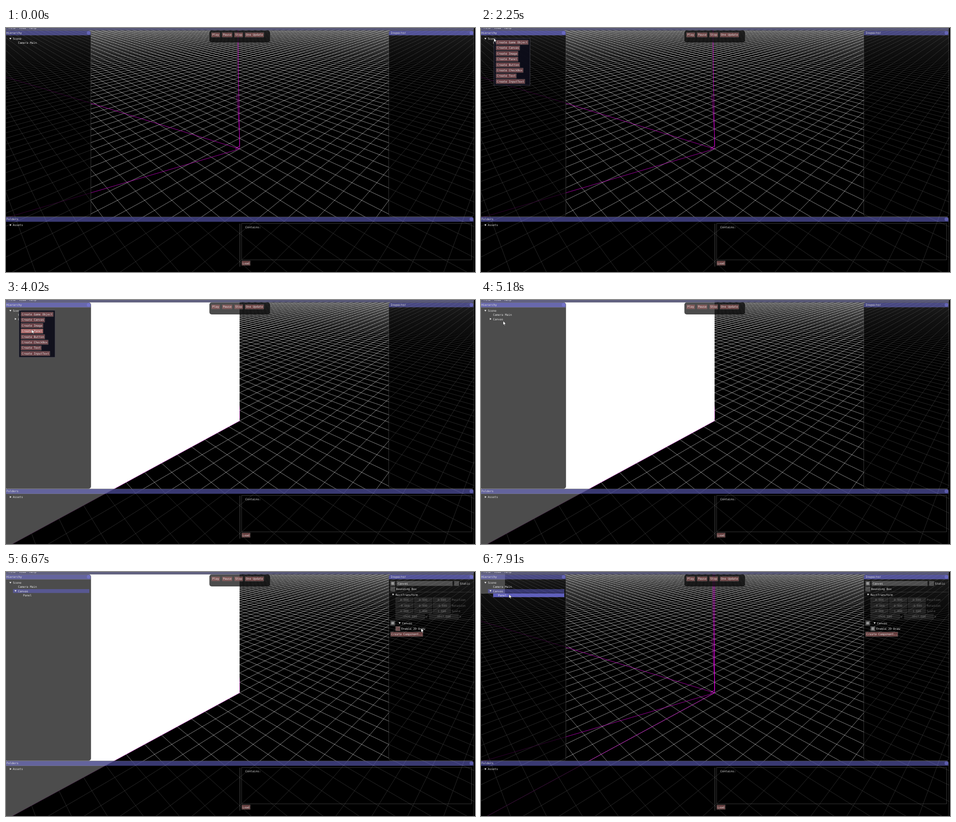
Recreate the animation shown at these times as an HTML page with a canvas. Size 1036 by 541 pixels, loop 8000 ms.

```html
<!DOCTYPE html>
<html>
<head>
<meta charset="utf-8">
<style>
html, body { margin: 0; width: 100%; height: 100%; overflow: hidden; background: #000; }
canvas { display: block; width: 100vw; height: 100vh; }
</style>
</head>
<body>
<canvas id="stage" width="1036" height="541"></canvas>
<script>
const LOOP = 8000, W = 1036, H = 541, CHAR = 3.777, ROW = 9.15, STEP = 12.4, INDENT = 11.3;
const ORIGIN = [516, 268], SLOPE = 0.544;
const ENTER = 150, POPUP = 2250, HELD = 3880, CREATE = 4020, CLOSE = 4790;
const SELECT = 5410, EXPAND = 5490, PRESS = 6590, FLAT = 6750;
const C = {
  text: '#e6e6e6', button: 'rgba(171,102,102,.6)', hot: 'rgb(171,102,102)',
  down: 'rgb(204,128,128)', border: 'rgba(90,90,90,.8)', frame: 'rgba(204,204,204,.3)',
  header: 'rgba(102,102,230,.45)', headerHot: 'rgba(115,115,230,.8)',
  title: 'rgba(69,69,138,.83)', titleOn: 'rgba(82,82,161,.87)',
  shade: 'rgba(0,0,0,.7)', magenta: '#d400d4'
};
const ITEMS = ['Game Object', 'Canvas', 'Image', 'Panel', 'Button', 'CheckBox', 'Text', 'InputText'];
// pointer moves: start, end, then where it stops
const MOVES = [
  [ENTER, 930, 36, 23], [1020, 1400, 28.5, 22.5], [2400, 2870, 58, 61], [2950, 3090, 57, 65.5],
  [4260, 4640, 140, 114], [4640, 5180, 49, 46.8], [5300, 5330, 48, 43], [5570, 6200, 1008, 164],
  [6200, 6440, 917, 125], [6830, 7180, 560, 24], [7180, 7680, 78, 60], [7680, 7910, 62, 49.5]
];

const ctx = document.getElementById('stage').getContext('2d');
let mouse;

function pointer(t) {
  if (t < ENTER) return [-99, -99];
  let x = 873, y = 518;
  for (const [start, end, toX, toY] of MOVES) {
    const k = Math.min(1, Math.max(0, (t - start) / (end - start)));
    const ease = k * k * (3 - 2 * k);
    x += (toX - x) * ease;
    y += (toY - y) * ease;
  }
  return [x, y];
}

function over(x, y, w, h) {
  return mouse[0] >= x && mouse[0] < x + w && Math.abs(mouse[1] - y) < h / 2;
}

function box(x, y, w, h, fill, stroke, r = 0) {
  ctx.beginPath();
  ctx.roundRect(x, y, w, h, r);
  if (fill) { ctx.fillStyle = fill; ctx.fill(); }
  if (stroke) { ctx.strokeStyle = stroke; ctx.lineWidth = 0.8; ctx.stroke(); }
}

function poly(points, fill) {
  ctx.beginPath();
  points.forEach(p => ctx.lineTo(...p));
  ctx.closePath();
  ctx.fillStyle = fill;
  ctx.fill();
}

function line(color, width, ...points) {
  ctx.beginPath();
  points.forEach(p => ctx.lineTo(...p));
  ctx.strokeStyle = color;
  ctx.lineWidth = width;
  ctx.stroke();
}

// y is the middle of the row for all widgets below
function text(s, x, y) {
  ctx.fillStyle = C.text;
  ctx.fillText(s, x, y + 2.2);
}

const buttonWidth = s => s.length * CHAR + 3.6;

function button(s, x, y, fill = C.button) {
  box(x, y - 5, buttonWidth(s), 10, fill, C.border);
  text(s, x + 2, y);
}

function arrow(x, y, open) {
  poly(open ? [[x - 2.2, y - 1.8], [x + 2.2, y - 1.8], [x, y + 2]]
            : [[x - 1.5, y - 2.2], [x + 2.2, y], [x - 1.5, y + 2.2]], C.text);
}

function check(s, x, y, on, fill = C.frame) {
  box(x, y - 5, 10, 10, fill, C.border);
  if (on) box(x + 2, y - 3, 6, 6, 'rgba(230,230,230,.5)');
  text(s, x + 12.5, y);
}

function field(s, x, y, w) {
  box(x, y - 5, w, 10, C.frame, C.border);
  text(s, x + (w - s.length * CHAR) / 2, y);
}

function panel(title, x, y, w, h, active) {
  box(x, y, w, 10.8, active ? C.titleOn : C.title, null, [5, 5, 0, 0]);
  box(x, y + 10.8, w, h - 10.8, C.shade, null, [0, 0, 5, 5]);
  box(x, y, w, h, null, C.border, 5);
  text(title, x + 4, y + 5.3);
  box(x + w - 9, y + 1.2, 8, 8, 'rgba(128,128,230,.5)', null, 4);
}

// ground grid seen along its diagonal by a camera at (10, 10, 10)
function project(a, b) {
  const k = 22.97 / (1 + (a + b) / 30);
  return [ORIGIN[0] + k * (a - b), ORIGIN[1] - SLOPE * k * (a + b)];
}

function makeGrid() {
  const layer = new OffscreenCanvas(W, H), g = layer.getContext('2d'), n = 100;
  g.strokeStyle = '#fff';
  g.lineWidth = 0.55;
  g.beginPath();
  for (let i = -n; i <= n; i++) {
    const near = Math.max(-n, -28 - i);
    if (near >= n) continue;
    g.moveTo(...project(i, near));
    g.lineTo(...project(i, n));
    g.moveTo(...project(near, i));
    g.lineTo(...project(n, i));
  }
  g.stroke();
  return layer;
}
const grid = makeGrid();

function drawScene(t) {
  const [x, y] = ORIGIN, m = C.magenta, corner = [-3, y + SLOPE * (x + 3)];
  box(0, 0, W, H, '#000');
  ctx.drawImage(grid, 0, 0);
  line(m, 0.8, [0, 109], [514, 267.4], [508, 265], [508, 270]);
  line(m, 0.8, [0, 421], [508, 270.5], [x, 267]);
  line(m, 1, [512.5, 0], [513, 80], [x, 262], [508, 266]);
  line(m, 0.7, [510, 148], [x, 240], ORIGIN);
  if (t < CREATE) return;
  if (t < FLAT) poly([[-3, -9], [x, -9], ORIGIN, corner], '#fff');
  else {
    line(m, 1, [x, 0], ORIGIN);
    box(-3, -8, 56, 56, '#fff');
  }
  line(m, t < FLAT ? 0.5 : 0.8, ORIGIN, corner);
}

function drawHierarchy(t, free) {
  const rows = [['Scene', 0, true], ['Camera Main', 1]];
  if (t >= CREATE) rows.push(['Canvas', 1, t >= EXPAND, t >= SELECT]);
  if (t >= EXPAND) rows.push(['Panel', 2]);
  rows.forEach(([name, depth, open, selected], i) => {
    const x = 4.2 + INDENT * depth, y = 24 + ROW * i;
    const hover = free && over(x, y, 184 - x, 8.6);
    if (hover || selected) box(x, y - 4.3, 184 - x, 8.6, hover ? C.headerHot : C.header);
    if (open !== undefined) arrow(x + 5.5, y - 0.3, open);
    text(name, x + 11, y);
  });
}

function drawInspector(t) {
  const x = 849.3, inner = x + INDENT, rowY = i => 25.3 + STEP * i + (i > 6 ? 1.2 : 0);
  const rule = y => line(C.border, 0.6, [846, y], [1033, y]);
  check('', x, rowY(0), true);
  box(863, rowY(0) - 5, 123, 10, C.frame, C.border);
  text('Canvas', 865.3, rowY(0));
  check('Static', 990.3, rowY(0), false);
  check('Bounding Box', x, rowY(1), false);
  rule(44.5);
  arrow(855, rowY(2), true);
  text('RectTransform', inner, rowY(2) + 0.4);
  ctx.globalAlpha = 0.42;
  ['Position', 'Rotation', 'Scale'].forEach((label, i) => {
    const y = rowY(3 + i) - 0.6;
    for (let j = 0; j < 3; j++) {
      const sign = i === 1 && j !== 1 ? '-' : '';
      field(sign + (i === 2 ? '1.000' : '0.000'), inner + 41.3 * j, y, 39);
    }
    text(label, 984.8, y);
  });
  [['1920.000', 'w'], ['1017.000', 'h']].forEach(([value, label], i) => {
    field(value, inner + 74.5 * i, rowY(6) - 0.9, 64.5);
    text(label, inner + 66.5 + 74.5 * i, rowY(6) - 0.9);
  });
  ctx.globalAlpha = 1;
  rule(106);
  check('', x, rowY(7), true);
  arrow(869.5, rowY(7), true);
  text('Canvas', 875, rowY(7));
  const held = t >= PRESS && t < FLAT;
  const hot = over(inner, rowY(8), 66, 10);
  check('Enable 2D Draw', inner, rowY(8), t >= FLAT,
    held ? 'rgba(230,166,166,.45)' : hot ? 'rgba(230,204,204,.4)' : C.frame);
  button('Create Component..', x, rowY(9));
}

function drawPopup(t) {
  box(28.7, 23, 79.6, 104, 'rgba(13,13,26,.92)', 'rgba(85,85,95,.9)');
  ITEMS.forEach((item, i) => {
    const s = 'Create ' + item, y = 31.8 + STEP * i;
    const hover = over(33, y, buttonWidth(s), 10);
    const held = hover && t >= HELD && t < CREATE;
    button(s, 33, y, held ? C.down : hover ? C.hot : C.button);
  });
}

function drawMenu() {
  box(0, 0, 1033, 5.2, C.shade);
  box(0, 0, 1033, 5.2, 'rgba(102,102,140,.8)');
  ['File', 'View', 'Help'].forEach((s, i) => text(s, 6 + 23 * i, 0.2));
}

function drawToolbar() {
  box(449.3, 5.5, 134, 26.5, C.shade, null, 5);
  let x = 453.8;
  for (const s of ['Play', 'Pause', 'Stop', 'One Update']) {
    button(s, x, 15.2);
    x += buttonWidth(s) + 4.8;
  }
}

function drawFolders() {
  arrow(10, 436.7, false);
  text('Assets', 15, 437);
  line('#777', 0.7, [516.7, 434], [516.7, 529]);
  box(520.5, 433.5, 508, 80.5, null, C.border);
  text('Contains:', 528.8, 441.3);
  button('Load', 520.8, 521.3);
}

function drawCursor() {
  ctx.save();
  ctx.translate(...mouse);
  poly([[0, 0], [0, 8.4], [1.9, 6.7], [3.2, 9.6], [4.5, 9], [3.2, 6.2], [5.9, 6]], '#fff');
  ctx.strokeStyle = '#000';
  ctx.lineWidth = 0.4;
  ctx.stroke();
  ctx.restore();
}

function draw(t) {
  const popup = t >= POPUP && t < CLOSE, inHierarchy = t >= POPUP && t < PRESS;
  mouse = pointer(t);
  ctx.font = '6.28px "DejaVu Sans Mono", monospace';
  drawScene(t);
  drawMenu();
  panel('Hierarchy', -3, 5.5, 190.5, 412.7, inHierarchy);
  panel('Inspector', 845.5, 5.5, 187.5, 412.7, !inHierarchy);
  panel('Folders', -3, 418.9, 1036, 124, false);
  drawToolbar();
  drawHierarchy(t, !popup);
  if (t >= SELECT) drawInspector(t);
  drawFolders();
  if (popup) drawPopup(t);
  box(1033.5, 0, 3, H, '#000');
  drawCursor();
}

function tick(now) {
  draw(now % LOOP);
  requestAnimationFrame(tick);
}
draw(0);
requestAnimationFrame(tick);
</script>
</body>
</html>
```
